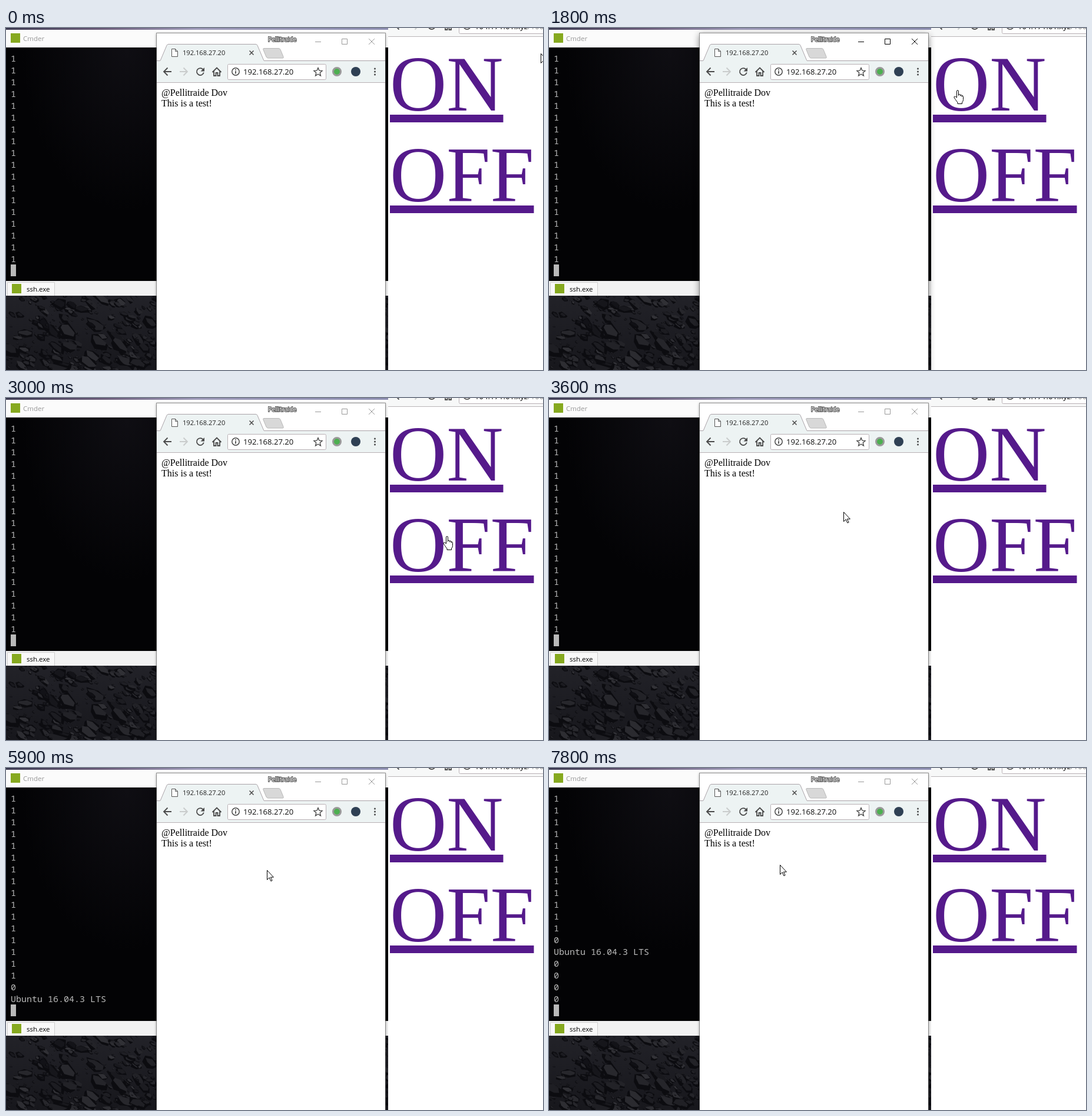
An HTML page with a canvas for the animation above (8000 ms loop, 912 px wide and 580 px high).

```html
<!DOCTYPE html>
<html lang="en">
<head>
<meta charset="utf-8">
<title>Remote switch</title>
<style>
  html, body { margin: 0; width: 100%; height: 100%; overflow: hidden; background: #111218; }
  #stage { position: relative; width: 912px; height: 580px; overflow: hidden; }
  #stage > * { position: absolute; left: 0; top: 0; }
  svg { display: block; overflow: hidden; }
  .ui { font-family: "Open Sans", "Noto Sans", sans-serif; }
  .page { font-family: "Liberation Serif", "Times New Roman", serif; }
  .link { font-size: 133.33px; fill: #551a8b; }
  .line { fill: none; stroke-width: 1.8; }

  #stage > .term { left: 8px; top: 41px; width: 240px; height: 360px; overflow: hidden; }
  .term pre { margin: 0; color: #b9b9b9; font: 15px/20px "Noto Sans Mono", "DejaVu Sans Mono", monospace; }

  /* every change is a hard step; 1.25% is 100 ms */
  .term pre, .win, .buttons, .hover, .tip, .pointer, .arrow, .hand {
    animation: 8s step-end infinite;
  }
  .term pre { animation-name: scroll; }
  .win { animation-name: shadow; }
  .buttons { animation-name: focus; }
  .hover { animation-name: hover; }
  .tip { animation-name: tip; }
  .pointer { animation-name: move; }
  .arrow { animation-name: arrow; }
  .hand { animation-name: hand; }

  @keyframes scroll {
    0% { transform: none; }
    46.25% { transform: translateY(-40px); }
    93.75%, 100% { transform: translateY(-120px); }
  }
  @keyframes shadow {
    0%, 36.25%, 100% { filter: drop-shadow(0 1px 2px #0005); }
    16.25% { filter: drop-shadow(0 3px 6px #0007); }
  }
  @keyframes focus {
    0%, 36.25%, 100% { stroke: #999; }
    16.25% { stroke: #000; }
  }
  @keyframes hover {
    0%, 18.75%, 100% { opacity: 0; }
    12.5% { opacity: 1; }
  }
  @keyframes tip {
    0%, 16.25%, 100% { opacity: 0; }
    12.5% { opacity: .3; }
    13.75% { opacity: .65; }
    15% { opacity: 1; }
  }
  @keyframes arrow {
    0%, 5%, 42.5%, 100% { opacity: 1; }
    2.5%, 22.5% { opacity: 0; }
  }
  @keyframes hand {
    0%, 5%, 42.5%, 100% { opacity: 0; }
    2.5%, 22.5% { opacity: 1; }
  }
  @keyframes move {
    0% { transform: translate(908px, 43px); }
    1.25% { transform: translate(888px, 55px); }
    2.5% { transform: translate(818px, 82px); }
    3.75% { transform: translate(735px, 106px); }
    5% { transform: translate(622px, 124px); }
    6.25% { transform: translate(457px, 131px); }
    7.5% { transform: translate(380px, 110px); }
    8.75% { transform: translate(338px, 84px); }
    10% { transform: translate(330px, 75px); }
    18.75% { transform: translate(345px, 80px); }
    20% { transform: translate(420px, 97px); }
    21.25% { transform: translate(603px, 101px); }
    22.5% { transform: translate(687px, 105px); }
    23.75% { transform: translate(700px, 107px); }
    25% { transform: translate(713px, 108px); }
    27.5% { transform: translate(722px, 122px); }
    28.75% { transform: translate(734px, 150px); }
    30% { transform: translate(731px, 193px); }
    31.25% { transform: translate(742px, 234px); }
    40% { transform: translate(734px, 231px); }
    41.25% { transform: translate(695px, 217px); }
    42.5% { transform: translate(602px, 200px); }
    43.75% { transform: translate(530px, 195px); }
    45% { transform: translate(500px, 193px); }
    46.25% { transform: translate(490px, 192px); }
    47.5% { transform: translate(478px, 192px); }
    48.75% { transform: translate(467px, 191px); }
    51.25% { transform: translate(462px, 191px); }
    52.5% { transform: translate(456px, 191px); }
    53.75% { transform: translate(451px, 191px); }
    71.25% { transform: translate(449px, 187px); }
    72.5% { transform: translate(445px, 178px); }
    73.75% { transform: translate(443px, 173px); }
    96.25% { transform: translate(412px, 169px); }
    97.5%, 100% { transform: translate(392px, 164px); }
  }
</style>
</head>
<body>
<div id="stage">
  <canvas id="wall" width="912" height="580"></canvas>

  <svg width="912" height="580" class="ui">
    <defs>
      <linearGradient id="sky">
        <stop offset="0" stop-color="#3a3850"/>
        <stop offset=".25" stop-color="#6a5a78"/>
        <stop offset=".5" stop-color="#9d99b8"/>
        <stop offset="1" stop-color="#8c8db0"/>
      </linearGradient>
      <radialGradient id="haze" cx=".8" cy="0" r=".7">
        <stop offset="0" stop-color="#0f0e13"/>
        <stop offset="1" stop-color="#030305"/>
      </radialGradient>
      <g id="nav">
        <path class="line" stroke="#4a4a4a" d="M281 74H268.500M274.500 67.500L268 74l6.500 6.500"/>
        <path class="line" stroke="#c9cccc" d="M295 74h12.500M301.500 67.500L308 74l-6.500 6.500"/>
        <path class="line" stroke="#4a4a4a" d="M334.600 70.200A6 6 0 1 0 335.800 75.500"/>
        <path fill="#4a4a4a" d="M337 67v6.500h-6.500z"/>
        <path class="line" stroke="#4a4a4a" d="M350.500 75L358 67.500l7.500 7.500M353 73.500V81h3.500v-5h3v5h3.500v-7.500"/>
        <rect x="376.500" y="61.500" width="167" height="26" rx="2" fill="#fff" stroke="#b9b0b5"/>
        <circle cx="390" cy="74" r="6.200" fill="none" stroke="#4a4a4a" stroke-width="1.500"/>
        <path class="line" stroke="#4a4a4a" d="M390 73v4.500M390 70v1.800"/>
      </g>
    </defs>

    <rect width="649" height="3" fill="url(#sky)"/>
    <rect y="3" width="649" height="30" fill="#fbfbfb"/>
    <rect x="8" y="9" width="16" height="16" fill="#86a91f"/>
    <text x="29" y="22" font-size="11.500" fill="#999">Cmder</text>
    <rect y="33" width="649" height="396" fill="#030305"/>
    <rect y="33" width="256" height="396" fill="url(#haze)"/>
    <rect x="8" y="401" width="9" height="20" fill="#b9b9b9"/>
    <rect y="429" width="649" height="25" fill="#f2f2f2"/>
    <path d="M2.500 454V431.500H82.500V454" fill="#f8f8f8" stroke="#cfcfcf"/>
    <rect x="10" y="434" width="16" height="16" fill="#86a91f"/>
    <text x="35" y="447" font-size="11.500">ssh.exe</text>

    <rect x="649" width="263" height="580" fill="#fff"/>
    <rect x="649" width="263" height="14" fill="#f7f8f8"/>
    <path d="M649 14.500h263" stroke="#b9b5b8"/>
    <use href="#nav" x="393" y="-78"/>
    <text x="796" y="2" font-size="13.100">104.171.61.xyz<tspan fill="#888">/1000</tspan></text>
    <g class="page link">
      <text x="652" y="140">ON</text>
      <text x="652" y="294">OFF</text>
      <rect x="652" y="147" width="192.500" height="13"/>
      <rect x="652" y="301" width="244.500" height="13"/>
    </g>
  </svg>

  <div class="term"><pre id="log"></pre></div>

  <svg width="912" height="580" class="ui">
    <g class="win">
      <rect x="255.500" y="8.500" width="389" height="590" fill="none" stroke="#5559"/>
      <rect x="256" y="9" width="388" height="590" fill="#fff"/>
    </g>
    <text x="445" y="23" font-size="10.400" fill="#fff" stroke="#555" stroke-width="2" paint-order="stroke">Pellitraide</text>
    <g class="buttons" fill="none" stroke="#999">
      <path d="M525 23.500h10M570.500 18.500h9v9h-9zM616 18l10 10M626 18l-10 10"/>
    </g>

    <rect x="256" y="55" width="388" height="38" fill="#edf3f3"/>
    <path d="M256 55.500h6l11-26q1-2 3-2h148q2 0 3 2l11 26H644" fill="#edf3f3" stroke="#aaa3a8"/>
    <path d="M262.500 56h175" stroke="#edf3f3" stroke-width="2"/>
    <path d="M438 34.500h25q2 0 3 2l5 12q1 2.500-1 2.500h-25q-2 0-3-2l-5-12q-1-2.500 1-2.500z" fill="#d8d8d8" stroke="#b8b8b8"/>
    <path d="M281.500 35.500h6l4 4v9h-10zM287.500 35.500v4h4" fill="#fff" stroke="#555"/>
    <text x="300" y="46" font-size="11.100" fill="#222">192.168.27.20</text>
    <path d="M413.500 38.500l7 7M420.500 38.500l-7 7" stroke="#4a4a4a" stroke-width="1.500"/>

    <path d="M256 92.500h388" stroke="#b9b0b5"/>
    <rect class="hover" x="318" y="62" width="24" height="24" rx="2" fill="#d9dcdc"/>
    <use href="#nav"/>
    <text x="403" y="79" font-size="13.100" fill="#111">192.168.27.20</text>
    <path d="M530 67.500l2 4.700 5 .4-3.800 3.300 1.200 5-4.400-2.700-4.400 2.700 1.200-5-3.800-3.300 5-.4z" fill="none" stroke="#4a4a4a" stroke-width="1.400"/>
    <circle cx="562" cy="74" r="6.500" fill="#4caf50" stroke="#9a9a9a" stroke-width="3"/>
    <circle cx="594" cy="74" r="8" fill="#2f4054"/>
    <path d="M626.500 69v.01M626.500 74v.01M626.500 79v.01" stroke="#4a4a4a" stroke-width="3" stroke-linecap="round"/>

    <g class="page" font-size="16">
      <text x="264" y="115">@Pellitraide Dov</text>
      <text x="264" y="133">This is a test!</text>
    </g>

    <g class="tip">
      <rect x="332" y="97" width="99" height="20" fill="#0003"/>
      <rect x="329.500" y="95.500" width="99" height="19" fill="#fff" stroke="#767676"/>
      <text x="335" y="109" font-size="11.300" fill="#575757">Reload this page</text>
    </g>

    <g class="pointer" fill="#fff" stroke="#000">
      <path class="arrow" d="M.5 .5v16l3.700-3.600 2.700 6 2.200-1-2.700-5.700h5z"/>
      <path class="hand" stroke-linejoin="round" d="M5.500 13V2.200a1.500 1.500 0 0 1 3 0V9.500v-1.500q1.500-1.200 3 .3v2-1.500q1.500-1 2.700.5v2-1.200q2.300-.8 2.300 1.400v5q0 3-2 4.500v2.500h-7.500v-2.500q-2-1.500-3.500-4.500l-2.500-3.500q-.5-2 1.500-2 1.300.2 3 2z"/>
    </g>
  </svg>
</div>
<script>
  document.getElementById('log').textContent =
    [...Array(18).fill(1), 0, 'Ubuntu 16.04.3 LTS', 0, 0, 0, 0].join('\n');

  const ctx = document.getElementById('wall').getContext('2d');
  let seed = 27;
  const rand = () => (seed = seed * 16807 % 2147483647) / 2147483647;

  const base = ctx.createLinearGradient(0, 454, 0, 580);
  base.addColorStop(0, '#222228');
  base.addColorStop(1, '#17171c');
  ctx.fillStyle = base;
  ctx.fillRect(0, 454, 912, 126);

  function stone(w, h, color) {
    ctx.fillStyle = color;
    ctx.beginPath();
    for (let i = 0; i < 6; i++) {
      const a = (i + rand() * .7) / 6 * Math.PI * 2;
      const r = .7 + rand() * .5;
      ctx.lineTo(Math.cos(a) * w * r, Math.sin(a) * h * r);
    }
    ctx.fill();
  }

  // Stones lie on a slope: a shadow below, then a lighter face.
  const count = 900;
  for (let i = 0; i < count; i++) {
    const depth = i / count;
    const w = 1.5 + rand() ** 3 * (8 + depth * 10), h = w * (.4 + rand() * .3);
    const v = 22 + rand() * 30 - depth * 6;
    ctx.save();
    ctx.translate(rand() * 660, 452 + rand() * 130);
    ctx.rotate(.1 + rand() * .7);
    stone(w * 1.2, h * 1.3, '#0c0c10');
    ctx.translate(0, -h * .3);
    stone(w, h * .8, `rgb(${v}, ${v}, ${v + 5})`);
    ctx.restore();
  }
</script>
</body>
</html>
```
